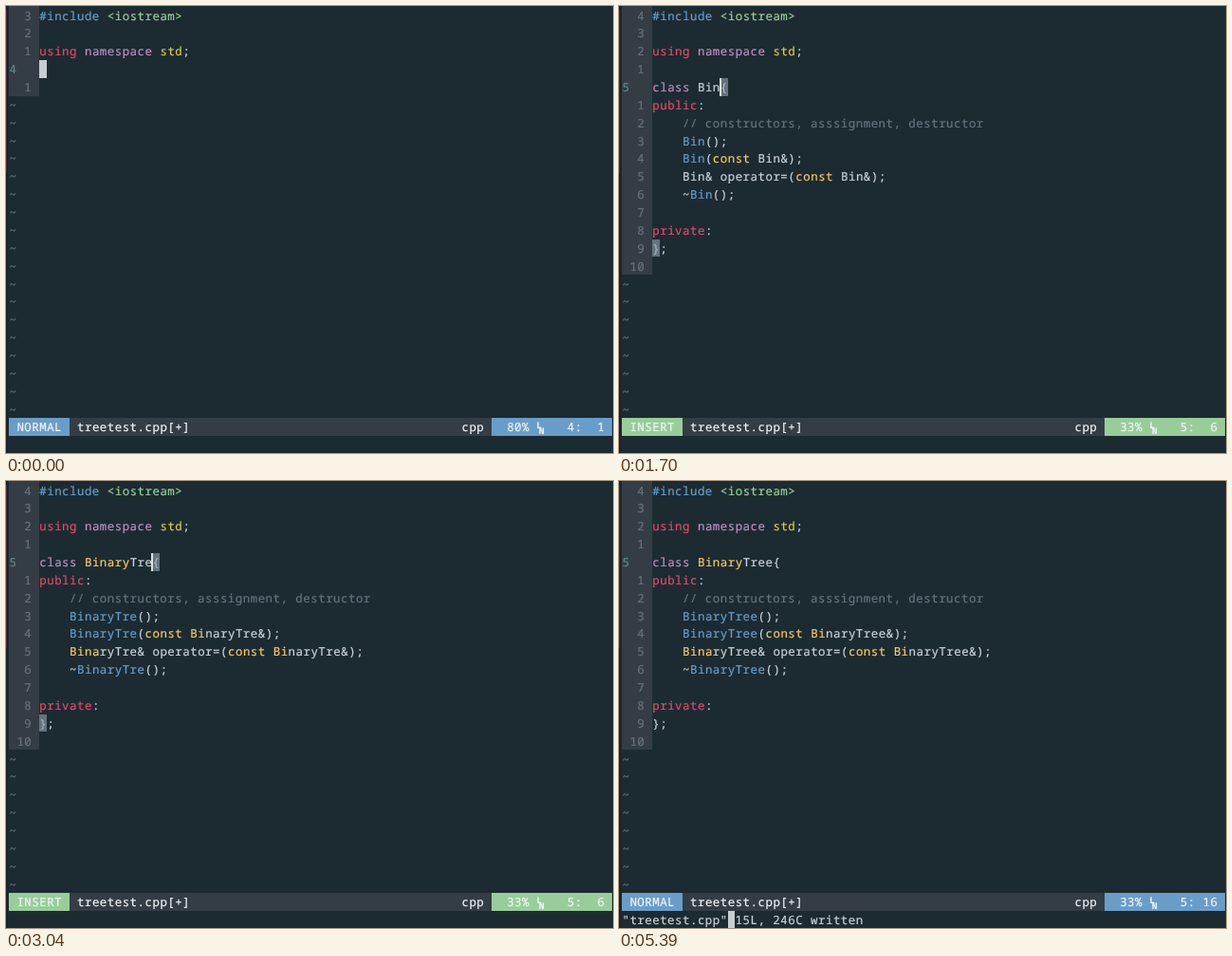
Recreate the animation shown at these times as an HTML page. Size 640 by 471 pixels, loop 5430 ms.

```html
<!DOCTYPE html>
<html lang="en">
<head>
<meta charset="utf-8">
<title>Snippet expansion in a terminal editor</title>
<style>
  html, body { margin: 0; width: 100%; height: 100%; overflow: hidden; background: #1c2b32; }
  svg { display: block; width: 640px; height: 471px; }
  text {
    font: 500 12.4px "Noto Sans Mono", "DejaVu Sans Mono", monospace;
    letter-spacing: 0.51px;
    stroke-width: 0.2px;
    white-space: pre;
    text-rendering: geometricPrecision;
  }
  .tiny { font-size: 9px; font-weight: 700; }
</style>
</head>
<body>
<svg id="stage" viewBox="0 0 640 471"></svg>
<script>
const LOOP = 5430;
const LEFT = 3.2, TOP = 0.4, CELL = 7.95, ROW = 18.86, BASE = 14.2;
const CODE = 4, LAST = 24, STATUS = 23;
const FILE = 'treetest.cpp';

const C = {
  bg: '#1c2b32', bar: '#343d46', text: '#cbd3da', dim: '#65737e', current: '#66838f',
  red: '#e5486b', purple: '#c08fc0', yellow: '#fac863', olive: '#d6cb48',
  blue: '#669dc9', green: '#99d095', cursor: '#c6ced4', select: '#56636d',
  brace: '#a9b4bb', white: '#f1f5f6'
};
const MODE_COLOR = { NORMAL: '#699dc9', INSERT: '#98cd9a', SELECT: '#f58864' };

// Keystroke times in ms
const OPEN = 220, EXPAND = 880, ESCAPE = 3400, WRITTEN = 5130;
const KEYWORD_KEYS = [320, 420, 500, 580, 700];
const NAME_KEYS = [1200, 1380, 1540, 1860, 2040, 2220, 2440, 2760, 2960, 3140];
const COMMAND_KEYS = [4600, 4840];

const stage = document.getElementById('stage');
const esc = s => s.replace(/&/g, '&amp;').replace(/</g, '&lt;');
const px = col => LEFT + col * CELL;
const py = row => TOP + row * ROW;
const typed = (word, keys, t) => word.slice(0, keys.filter(k => t >= k).length);

function rect(x, y, w, h, fill) {
  return `<rect x="${x}" y="${y}" width="${w}" height="${h}" fill="${fill}"/>`;
}
// A run of cells, snapped to whole pixels
function block(row, col, cols, fill, rows = 1) {
  const x = Math.round(px(col)), y = Math.round(py(row));
  return rect(x, y, Math.round(px(col + cols)) - x, Math.round(py(row + rows)) - y, fill);
}
function glyphs(x, y, str, fill, cls = '') {
  return `<text class="${cls}" x="${x}" y="${y}" fill="${fill}" stroke="${fill}">${esc(str)}</text>`;
}
function label(row, col, str, fill) {
  return glyphs(px(col) + 0.25, py(row) + BASE, str, fill);
}
function line(row, tokens) {
  let col = CODE, out = '';
  for (const [str, color] of tokens) {
    if (str.trim()) out += label(row, col, str, C[color]);
    col += str.length;
  }
  return out;
}
function matched(row, col, str) {
  return block(row, col, 1, C.dim) + label(row, col, str, C.brace);
}
function bar(row, col) {
  return rect(Math.round(px(col)) - 1, Math.round(py(row)), 2, 19, '#dbe1e5');
}

const HEADER = [
  [['#include ', 'blue'], ['<iostream>', 'green']],
  [],
  [['using', 'red'], [' namespace ', 'purple'], ['std', 'olive'], [';', 'text']],
  []
];

// Splits a name into a highlighted head and a plain tail
const split = (name, n) => [[name.slice(0, n), 'yellow'], [name.slice(n), 'text']];

function classBody(name, t) {
  const late = t >= NAME_KEYS[7];
  const warm = t >= NAME_KEYS[4];
  return [
    [['class ', 'purple'], ...split(name, warm ? 6 : 0), ['{', 'text']],
    [['public', 'red'], [':', 'text']],
    [['    // constructors, asssignment, destructor', 'dim']],
    [['    ', 'text'], [name, 'blue'], ['();', 'text']],
    [['    ', 'text'], [name, 'blue'], ['(', 'text'], ['const ', 'yellow'],
      ...split(name, late ? 2 : 0), ['&);', 'text']],
    [['    ', 'text'], ...split(name, late ? 4 : warm ? 3 : 0), ['& operator=(', 'text'],
      ['const ', 'yellow'], ...split(name, late ? 2 : 0), ['&);', 'text']],
    [['    ~', 'text'], [name, 'blue'], ['();', 'text']],
    [],
    [['private', 'red'], [':', 'text']],
    [['};', 'text']],
    []
  ];
}

function stateAt(t) {
  if (t < OPEN) {
    return { mode: 'NORMAL', lines: [...HEADER, []], current: 3, percent: '80%', pos: '4:  1' };
  }
  if (t < EXPAND) {
    const word = typed('class', KEYWORD_KEYS, t);
    return {
      mode: 'INSERT', current: 4, percent: '83%', pos: '5:  1', caret: word.length,
      lines: [...HEADER, [[word, word === 'class' ? 'purple' : 'text']], []]
    };
  }
  const name = typed('BinaryTree', NAME_KEYS, t);
  const state = {
    lines: [...HEADER, ...classBody(name || 'Class', t)],
    current: 4, percent: '33%', name
  };
  if (!name) return { ...state, mode: 'SELECT', pos: '5: 11' };
  if (t < ESCAPE) return { ...state, mode: 'INSERT', pos: '5:  6', caret: 6 + name.length };
  return { ...state, mode: 'NORMAL', pos: '5: 16', command: typed(':w', COMMAND_KEYS, t) };
}

function gutter(s) {
  let out = block(0, 0, CODE, C.bar, s.lines.length);
  s.lines.forEach((_, row) => {
    const n = Math.abs(row - s.current);
    out += n ? label(row, n > 9 ? 1 : 2, String(n), C.dim)
             : label(row, 0, String(row + 1), C.current);
  });
  for (let row = s.lines.length; row < STATUS; row++) out += label(row, 0, '~', C.dim);
  return out;
}

function statusBar(s) {
  const tint = MODE_COLOR[s.mode];
  const text = (col, str) => label(STATUS, col, str, C.white);
  return block(STATUS, 0, 80, C.bar) + block(STATUS, 0, 8, tint) + block(STATUS, 64, 16, tint) +
    text(1, s.mode) + text(9, FILE + '[+]') + text(60, 'cpp') + text(66, s.percent) +
    glyphs(559.5, 444.5, 'L', C.white, 'tiny') + glyphs(562, 451, 'N', C.white, 'tiny') +
    text(74, s.pos);
}

function cursor(s, t) {
  const row = s.current;
  if (s.mode === 'SELECT') {
    return block(row, 10, 4, C.select) + label(row, 10, 'Clas', C.text) +
      block(row, 14, 1, C.cursor) + label(row, 14, 's', C.bg) + label(LAST, 69, '5', C.text);
  }
  if (s.mode === 'INSERT') {
    const col = CODE + s.caret;
    return (s.name ? matched(row, col, '{') + matched(13, CODE, '}') : '') + bar(row, col);
  }
  if (t >= WRITTEN) {
    return label(LAST, 0, `"${FILE}" 15L, 246C written`, C.text) + block(LAST, 14, 1, C.cursor);
  }
  if (s.command) {
    return label(LAST, 0, s.command, C.text) + block(LAST, s.command.length, 1, C.cursor);
  }
  return s.name ? block(row, 19, 1, C.cursor) + label(row, 19, 'e', C.bg)
                : block(row, CODE, 1, C.cursor);
}

function render(t) {
  const s = stateAt(t);
  return rect(0, 0, 640, 471, C.bg) + rect(0, 0, 2, 471, '#1a222a') +
    rect(0, 4, 1, 172, '#4a2a35') + gutter(s) +
    s.lines.map((tokens, row) => line(row, tokens)).join('') +
    statusBar(s) + cursor(s, t);
}

let shown = '';
const start = performance.now();
function tick() {
  const next = render((performance.now() - start) % LOOP);
  if (next !== shown) stage.innerHTML = shown = next;
  requestAnimationFrame(tick);
}
tick();
</script>
</body>
</html>
```
